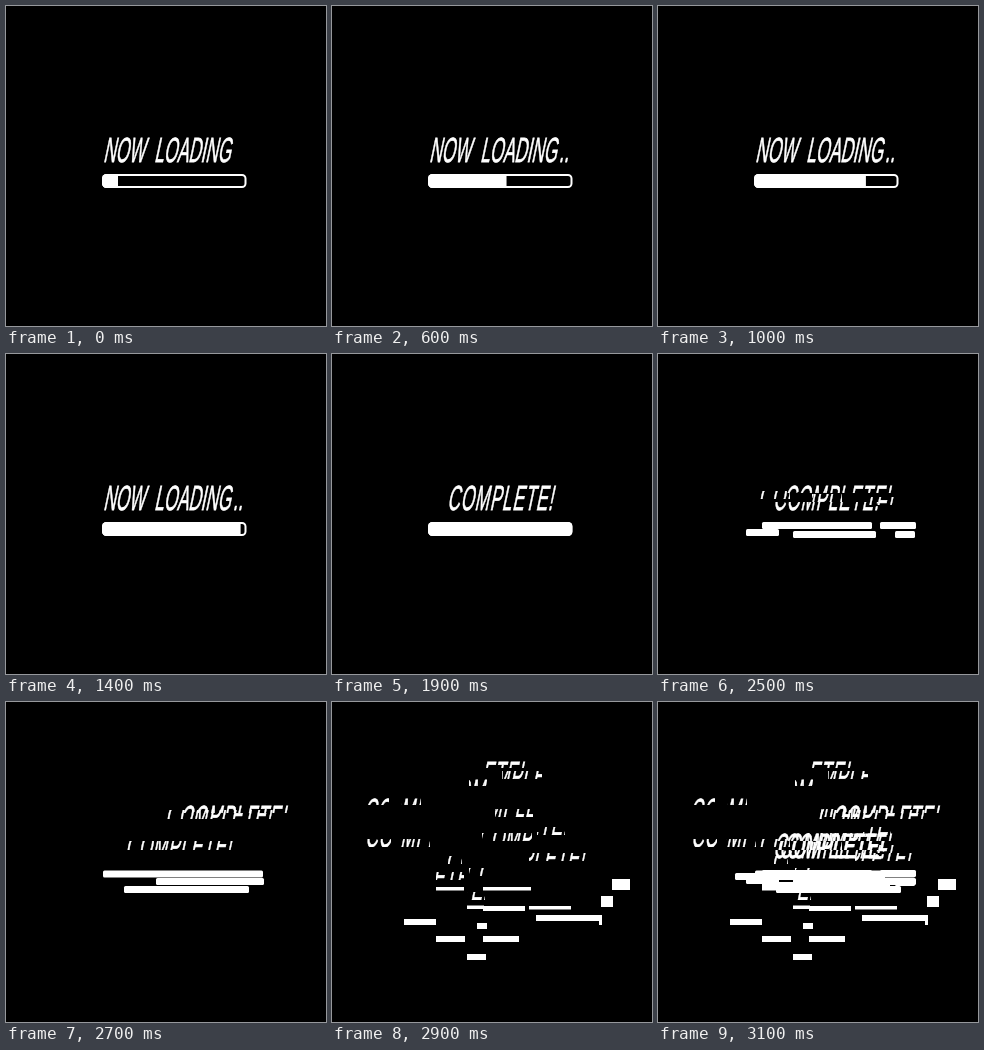
Animation, 320 px wide and 320 px high, one loop 3200 ms. Source, as an HTML page:

```html
<!DOCTYPE html>
<html lang="en">
<head>
<meta charset="utf-8">
<title>Now loading</title>
<style>
  html, body { margin: 0; width: 100%; height: 100%; overflow: hidden; background: #000; }
  svg { display: block; }
  #stage { width: 100vw; height: 100vh; }
  text {
    font: 35px "Liberation Sans", Arial, sans-serif;
    font-kerning: none;
    fill: #fff; stroke: #fff; stroke-width: .8px;
  }
  #done text { letter-spacing: 1.85px; }
  #dots { letter-spacing: .6px; }
</style>
</head>
<body>
<svg id="stage" viewBox="0 0 320 320">
  <defs>
    <clipPath id="pill"><rect x="96" y="168" width="144.5" height="14" rx="4.5"/></clipPath>
    <g id="done"><text transform="matrix(.486 0 -.21 1 115 155.5)">COMPLETE!</text></g>
  </defs>
  <rect width="320" height="320"/>
  <g id="loading">
    <text transform="matrix(.486 0 -.21 1 97 155.5)">NOW</text>
    <text transform="matrix(.486 0 -.21 1 148 155.5)">LOADING</text>
    <text id="dots" transform="matrix(.486 0 -.21 1 226.7 155.5)"></text>
  </g>
  <use id="complete" href="#done"/>
  <g id="bar">
    <rect x="97" y="169" width="142.5" height="12" rx="3.5" fill="none" stroke="#fff" stroke-width="2"/>
    <rect id="fill" x="96" y="168" height="14" fill="#fff" clip-path="url(#pill)"/>
  </g>
  <g id="shards" fill="#fff"></g>
</svg>
<script>
const LOOP = 3200, STEP = 100, BREAK = 25, ROW = 9;
const $ = id => document.getElementById(id);

// Cut a piece out of one of the three rows of the word and set it down at x, y.
const cut = (row, sx, w, x, y, h = 8) =>
  `<svg x="${x}" y="${y}" width="${w}" height="${h}" viewBox="${sx} ${130 + ROW * row} ${w} ${h}"><use href="#done"/></svg>`;
const strip = (row, dx, dy = 0) => cut(row, 112, 116, 112 + dx, 130 + ROW * row + dy, ROW);
const cuts = (row, list) => list.map(p => cut(row, ...p)).join("");
const slabs = (h, rx, list) => list.map(([x, y, w]) =>
  `<rect x="${x}" y="${y}" width="${w}" height="${h}" rx="${rx}"/>`).join("");

// Source x, width, then landing x, y.
const tops = [[184, 42, 153, 58], [142, 18, 137, 76], [117, 24, 33, 95], [144, 20, 69, 95]];
const middles = [
  [150, 40, 170, 69], [120, 50, 150, 131], [166, 58, 197, 151],
  [118, 14, 116, 154], [184, 28, 104, 170], [120, 18, 137, 166]
];
const lows = [
  [150, 38, 163, 107], [190, 28, 205, 125], [117, 24, 35, 137],
  [142, 30, 68, 137], [200, 18, 135, 190]
];

const words = [
  strip(0, 10) + [0, 1, 2].map(i => cut(1, 117 + 38 * i, 30, 102 + 52 * i, 137 + 3 * i)).join("") + strip(2, 0),
  strip(0, 0) + strip(1, 3) + strip(2, 6),
  strip(0, 58, -28) + strip(1, 44, -31) + strip(1, 4),
  cuts(0, tops) + cuts(1, middles) + cuts(2, lows)
];

const bars = [
  slabs(7, 1.5, [[88, 175, 33], [104, 168, 110], [222, 168, 36], [237, 177, 20], [135, 177, 83]]),
  slabs(7, 1.5, [[77, 171, 150], [104, 180, 128]]),
  slabs(7, 1.5, [[97, 168.5, 160], [118, 184, 125], [150, 176, 108]]),
  slabs(3.5, 0, [[104, 185, 28], [151, 185, 48], [135, 203.5, 17], [197, 204, 42]]) +
  slabs(5, 0, [[151, 204, 42]]) +
  slabs(6, 0, [[204, 213, 66], [72, 217, 32], [145, 221, 10], [104, 234, 29], [151, 234, 36], [135, 252, 19]]) +
  slabs(10, 0, [[267, 213, 3]]) +
  slabs(11, 0, [[269, 194, 12], [280, 177, 18]])
];

const layers = (list, id) => list.map((body, i) => `<g id="${id}${i}">${body}</g>`).join("");
$("shards").innerHTML = layers(words, "word") + layers(bars, "slab");

const show = (id, on) => $(id).setAttribute("visibility", on ? "visible" : "hidden");

function draw(time) {
  const step = Math.floor(time % LOOP / STEP);
  const n = Math.min(step < 15 ? step : step - 1, 16);
  const k = step - BREAK;
  const whole = k < 0;

  show("bar", whole);
  $("fill").setAttribute("width", Math.min(144.5, 16 + 11.67 * n - 0.208 * n * n));

  show("loading", step < 19);
  $("dots").textContent = ".".repeat(n % 4);

  // The finished word blinks twice, then holds.
  show("complete", whole && step >= 19 && (step % 2 === 1 || step === 24));

  // Break apart, go dark, then flash every layer at once.
  const apart = k >= 0 && k < 5, flash = k === 6;
  const word = k < 4 ? Math.min(k, 2) : 3;
  words.forEach((_, i) => show("word" + i, flash || apart && i === word));
  bars.forEach((_, i) => show("slab" + i, flash || apart && i === Math.min(k, 3)));
}

function tick() {
  draw(performance.now());
  requestAnimationFrame(tick);
}
tick();
</script>
</body>
</html>
```
